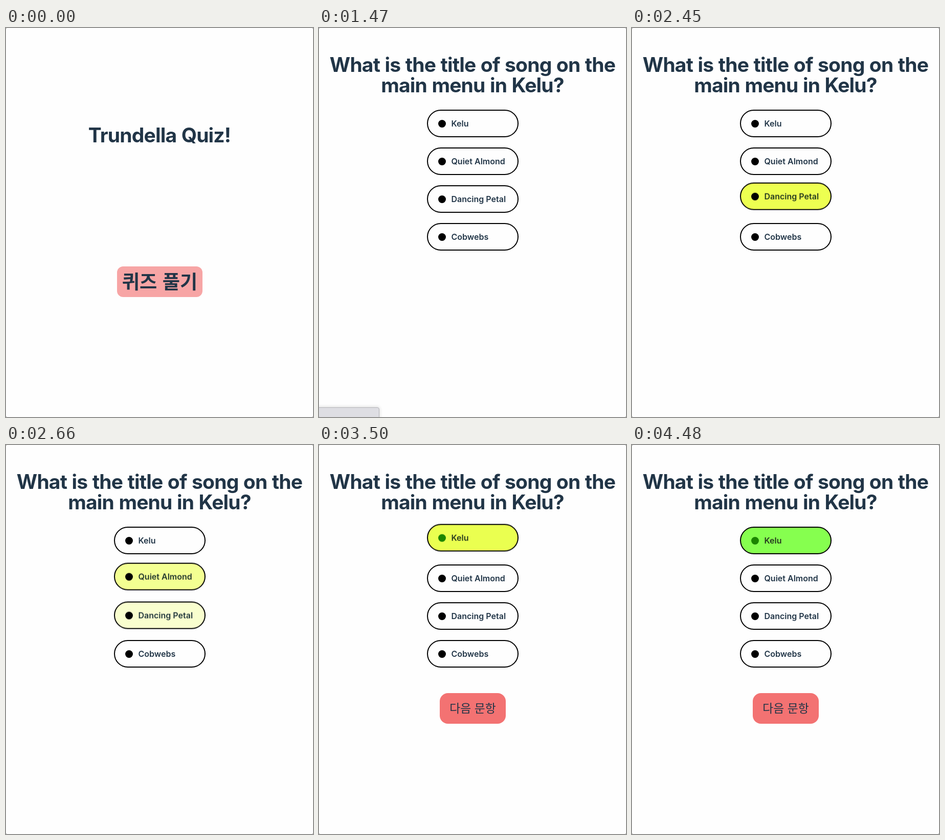
Write an HTML page that moves like this. It is 600x762 px and loops after 5040 ms.

```html
<!DOCTYPE html>
<html lang="ko">
<head>
<meta charset="utf-8">
<title>Quiz</title>
<style>
  @property --hover { syntax: "<number>"; inherits: true; initial-value: 0; }
  @property --tint { syntax: "<color>"; inherits: true; initial-value: #edff50; }

  html, body { margin: 0; width: 100%; height: 100%; overflow: hidden; background: #777; }

  .stage {
    position: relative; width: 600px; height: 762px; overflow: hidden;
    background: #fefefe; border-radius: 2px; color: #213547;
    font-family: Inter, "Noto Sans CJK KR", sans-serif;
    font-optical-sizing: none;
  }
  .stage * { position: absolute; box-sizing: border-box; margin: 0; white-space: nowrap; }
  .page { inset: 0; }

  /* Every animation shares the same 5040 ms loop. */
  .page, .bar, .start, .option, .dot, .next { animation: 5040ms infinite; }

  h1 {
    left: 0; width: 600px; text-align: center;
    font-size: 39px; font-weight: 700; line-height: 40px;
    letter-spacing: -.021em; word-spacing: .025em;
  }
  .stage h1 br { position: static; }
  .intro h1 { top: 190px; }
  .loading h1 { top: 364px; }
  .quiz h1 { top: 52px; }

  .button {
    height: 60px; text-align: center;
    font-family: "Noto Sans CJK KR", "Noto Sans CJK", sans-serif;
  }
  .start {
    left: 217px; top: 467px; width: 167px; border-radius: 12px;
    background: #f7a5a5; font-size: 37.2px; font-weight: 700; line-height: 56px;
    animation-name: lift;
  }
  .next {
    left: 236px; top: 486px; width: 129px; border-radius: 16px;
    background: #f37272; font-size: 22.8px; line-height: 58px;
    animation-name: answered; animation-timing-function: step-end;
  }

  .option {
    left: 211px; width: 179px; height: 54px;
    border: 2px solid #000; border-radius: 27px;
    background: color-mix(in srgb, var(--tint) calc(var(--hover) * 100%), #fefefe);
    color: color-mix(in srgb, #25381f calc(var(--hover) * 100%), #213547);
    transform: translateY(calc(var(--hover) * -10%));
    will-change: transform;
    font-size: 16px; font-weight: 600; line-height: 50px;
  }
  .option span { left: 45.5px; }
  .dot { left: 20px; top: 17.5px; width: 15px; height: 15px; border-radius: 50%; background: #000; }
  .first { top: 160px; animation-name: choose; }
  .second { top: 234px; animation-name: pass-second; }
  .third { top: 308px; animation-name: pass-third; }
  .fourth { top: 382px; }
  .first .dot { animation-name: mark; animation-timing-function: step-end; }

  .bar {
    left: -4px; top: 743px; width: 122px; height: 24px;
    background: #dedee3; border: 1px solid #b3b3b8; border-radius: 4px;
    box-shadow: 0 0 6px 1px #0002;
    animation-name: show-bar; animation-timing-function: step-end;
  }

  .intro { animation-name: show-intro; animation-timing-function: step-end; }
  .loading { animation-name: show-loading; animation-timing-function: step-end; }
  .quiz { animation-name: show-quiz; animation-timing-function: step-end; }

  @keyframes show-intro { 0% { opacity: 1; } 16.57%, 100% { opacity: 0; } }
  @keyframes show-loading { 0% { opacity: 0; } 23.51% { opacity: 1; } 29.07%, 100% { opacity: 0; } }
  @keyframes show-quiz { 0% { opacity: 0; } 29.07%, 100% { opacity: 1; } }
  @keyframes show-bar { 0% { opacity: 1; } 34.62%, 100% { opacity: 0; } }
  @keyframes answered { 0% { opacity: 0; } 69.05%, 100% { opacity: 1; } }
  @keyframes mark { 0% { background: #000; } 69.05%, 100% { background: #1c8500; } }

  @keyframes lift {
    0%, 6.25% { transform: translateY(0); animation-timing-function: ease; }
    11.2%, 100% { transform: translateY(-10%); }
  }

  /* The chosen option keeps its fill and turns green while it settles back. */
  @keyframes choose {
    0%, 58.23% { --hover: 0; transform: translateY(0); animation-timing-function: ease; }
    68.15% { --hover: 1; transform: translateY(-10%); }
    0%, 69.05% { --tint: #edff50; animation-timing-function: ease; }
    78.67% { transform: translateY(-10%); animation-timing-function: ease; }
    78.97% { --tint: #86ff4f; }
    88.59% { transform: translateY(0); }
    100% { --hover: 1; --tint: #86ff4f; transform: translateY(0); }
  }
  @keyframes pass-second {
    0%, 49.27% { --hover: 0; animation-timing-function: cubic-bezier(.27, .09, .29, .89); }
    57.74% { --hover: 1; animation-timing-function: ease; }
    67.66%, 79.07% { --hover: 0; }
    80.46% { --hover: .15; }
    81.85%, 100% { --hover: 0; }
  }
  @keyframes pass-third {
    0%, 36.71% { --hover: 0; animation-timing-function: ease; }
    46.63%, 48.51% { --hover: 1; animation-timing-function: ease; }
    58.43%, 80.95% { --hover: 0; }
    82.34% { --hover: .15; }
    83.93%, 100% { --hover: 0; }
  }
</style>
</head>
<body>
<main class="stage">
  <section class="page intro">
    <h1>Trundella Quiz!</h1>
    <div class="button start">퀴즈 풀기</div>
  </section>
  <section class="page loading">
    <h1>Loading</h1>
  </section>
  <section class="page quiz">
    <h1>What is the title of song on the<br>main menu in Kelu?</h1>
    <div class="option first"><i class="dot"></i><span>Kelu</span></div>
    <div class="option second"><i class="dot"></i><span>Quiet Almond</span></div>
    <div class="option third"><i class="dot"></i><span>Dancing Petal</span></div>
    <div class="option fourth"><i class="dot"></i><span>Cobwebs</span></div>
    <div class="button next">다음 문항</div>
    <div class="bar"></div>
  </section>
</main>
</body>
</html>
```
